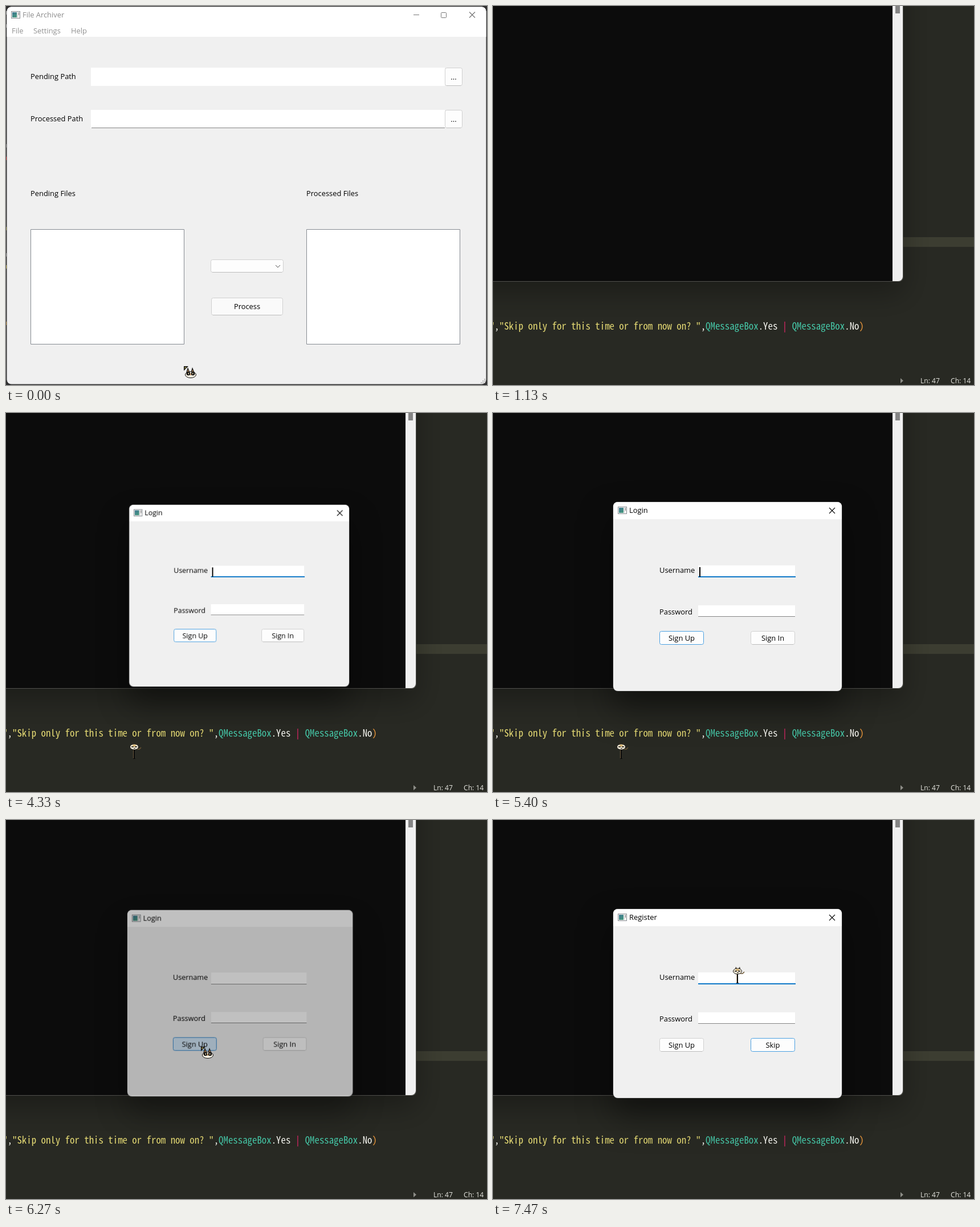
Animation of 844 by 664 pixels, one loop 8 s. Source, as an HTML page with a canvas:

```html
<!DOCTYPE html>
<html lang="en">
<head>
<meta charset="utf-8">
<title>File Archiver</title>
<style>
html, body { margin: 0; width: 100%; height: 100%; overflow: hidden; background: #282923; }
canvas { display: block; }
</style>
</head>
<body>
<canvas id="stage" width="844" height="664"></canvas>
<script>
const W = 844, H = 664, LOOP = 8000, TICK = 200 / 3;
const UI = '"Open Sans", "Noto Sans", sans-serif';
const MONO = '"Noto Sans Mono CJK JP", "Noto Sans Mono CJK SC", "Noto Sans Mono", monospace';
const stage = document.getElementById('stage').getContext('2d');
const layer = Object.assign(document.createElement('canvas'), { width: W, height: H }).getContext('2d');
let g = stage;

const lerp = (a, b, k) => a + (b - a) * k;
const clamp = k => Math.max(0, Math.min(1, k));
const smooth = k => k * k * (3 - 2 * k);

function rect(x, y, w, h, color) {
  g.fillStyle = color;
  g.fillRect(x, y, w, h);
}

function box(x, y, w, h, r, fill, stroke) {
  g.beginPath();
  g.roundRect(x, y, w, h, r);
  if (fill) { g.fillStyle = fill; g.fill(); }
  if (stroke) { g.strokeStyle = stroke; g.lineWidth = 1; g.stroke(); }
}

function lines(color, width, ...paths) {
  g.strokeStyle = color;
  g.lineWidth = width;
  g.beginPath();
  for (const p of paths)
    for (let i = 0; i < p.length; i += 2) i ? g.lineTo(p[i], p[i + 1]) : g.moveTo(p[i], p[i + 1]);
  g.stroke();
}

function shape(color, ...p) {
  g.fillStyle = color;
  g.beginPath();
  for (let i = 0; i < p.length; i += 2) g.lineTo(p[i], p[i + 1]);
  g.fill();
}

function oval(x, y, rx, ry, fill, stroke) {
  g.beginPath();
  g.ellipse(x, y, rx, ry, 0, 0, 7);
  g.fillStyle = fill;
  g.fill();
  if (stroke) { g.strokeStyle = stroke; g.lineWidth = 1; g.stroke(); }
}

function text(s, x, y, color = '#000', size = 12.9, align = 'left') {
  g.font = `${size}px ${UI}`;
  g.textAlign = align;
  g.fillStyle = color;
  g.fillText(s, x, y);
}

function button(s, x, y, w, h, border = '#d0d0d0', fill = '#fdfdfd') {
  box(x + .5, y + .5, w - 1, h - 1, 3, fill, border);
  if (border === '#d0d0d0') rect(x + 3, y + h - 1, w - 6, 1, '#bdbdbd');
  text(s, x + w / 2, Math.round(y + h / 2 + 4.5), '#000', 12.9, 'center');
}

function closeMark(x, y, color) {
  lines(color, 1.2, [x - 5, y - 5, x + 5, y + 5], [x + 5, y - 5, x - 5, y + 5]);
}

function appIcon(x, y) {
  rect(x, y, 16, 13, '#8b8f94');
  rect(x + 1, y + 1, 14, 11, '#f4f4f4');
  const teal = g.createLinearGradient(x, y, x + 8, y + 12);
  teal.addColorStop(0, '#3c6f98');
  teal.addColorStop(1, '#46997c');
  rect(x + 2, y + 2, 8, 9, teal);
  rect(x + 11, y + 2, 1, 9, '#c8c8c8');
  rect(x + 13, y + 2, 1, 5, '#777');
}

function mainWindow(n) {
  rect(0, 0, W, H, '#303030');
  for (const [y, c] of [[12, '#888'], [35, '#888'], [245, '#777'], [267, '#b33'], [390, '#8a8440'],
    [436, '#888'], [457, '#a99a40'], [556, '#a87a30']]) rect(0, y - 3, 1, 6, c);
  g.save();
  g.beginPath();
  g.roundRect(1.5, 1.5, 841, 661, 8);
  g.clip();
  rect(0, 0, W, H, '#f0f0f0');
  rect(0, 0, W, 54, '#fff');
  g.restore();

  appIcon(9, 9);
  text('File Archiver', 29, 20, '#8c8c8c');
  lines('#777', 1, [715, 15.5, 725, 15.5]);
  box(763.5, 11.5, 9, 9, 1, null, '#777');
  closeMark(818, 15.5, '#777');
  [['File', 10], ['Settings', 48], ['Help', 114]].forEach(([s, x]) => text(s, x, 48, '#929292'));

  [['Pending Path', 108], ['Processed Path', 182]].forEach(([s, y], i) => {
    text(s, 43, y + 20);
    rect(149, y, 621, 32, '#fff');
    if (i || n >= 8) rect(150, y + 31, 620, 1, '#868686');
    button('...', 770, y, 31, 32);
  });

  text('Pending Files', 43, 333);
  text('Processed Files', 527, 333);
  for (const x of [43.5, 527.5]) box(x, 391.5, 269, 201, 0, '#fff', '#868b92');

  button('', 359, 444, 128, 23);
  lines('#555', 1, [473, 454, 477, 458, 481, 454]);
  const glow = Math.round(lerp(250, 253, clamp(n / 3)));
  button('Process', 360, 511, 126, 31, undefined, `rgb(${glow},${glow},${glow})`);

  for (let i = 0; i < 3; i++)
    for (let j = 0; j <= i; j++) rect(839 - 3 * j, 653 + 3 * i, 2, 2, '#b4b4b4');
}

function codeLine() {
  const pitch = 8.42, probe = 100;
  g.textAlign = 'left';
  g.font = `${probe}px ${MONO}`;
  g.font = `${pitch * probe / g.measureText('0').width}px ${MONO}`;
  let x = 2.6 - pitch;
  for (const [s, c] of [['"', '#e6db74'], [',', '#f8f8f2'],
    ['"Skip only for this time or from now on? "', '#e6db74'], [',', '#f8f8f2'],
    ['QMessageBox', '#46c9a9'], ['.Yes ', '#f8f8f2'], ['| ', '#f92672'],
    ['QMessageBox', '#46c9a9'], ['.No', '#f8f8f2'], [')', '#f09a3c']]) {
    g.fillStyle = c;
    g.fillText(s, x, 567);
    x += s.length * pitch;
  }
}

function shadowBox(x, y, w, h, fill, blur, drop, alpha) {
  g.save();
  g.shadowColor = `rgba(0,0,0,${alpha})`;
  g.shadowBlur = blur;
  g.shadowOffsetY = drop;
  box(x, y, w, h, 8, fill);
  g.restore();
}

function editor() {
  rect(0, 0, W, H, '#282923');
  rect(0, 405, W, 17, '#3c3d31');
  shadowBox(-100, -100, 820, 583, '#50504c', 50, 20, .3);
  box(-100, -100, 819, 582, 8, '#f0f0f0');
  rect(0, 0, 701, 482, '#0c0c0c');
  rect(706, 0, 8, 13, '#858585');
  codeLine();
  shape('#8d8d87', 715, 652, 720, 656.5, 715, 661);
  text('Ln: 47', 750, 661, '#e4e4de', 12.1);
  text('Ch: 14', 803, 661, '#e4e4de', 12.1);
}

function dialog({ title, second, primary, caret, focus, hover, closing }) {
  const blue = '#4ba0e1';
  shadowBox(210.5, 155.5, 402, 332, '#4a4a4a', 56, 30, .42);
  box(211, 156, 401, 331, 8, '#f0f0f0');
  box(211, 156, 401, 30, [8, 8, 0, 0], '#fff');
  appIcon(219, 164);
  text(title, 239, 175);
  if (!closing) closeMark(595, 171, '#111');

  text('Username', 292, 280);
  rect(360, 267, 170, 21, '#fff');
  if (focus) rect(360, 286, 171, 2, '#0f78c8');
  else rect(360, 287, 170, 1, '#868686');
  if (caret) rect(362, 270, 2, 17, '#000');
  text('Password', 292, 353);
  rect(360, 337, 170, 20, '#fff');
  rect(360, 356, 170, 1, '#868686');

  const edge = i => primary === i ? blue : undefined;
  button('Sign Up', 292, 382, 78, 24, hover ? '#2f86cc' : edge(0), hover ? '#d3e9fa' : undefined);
  button(second, 452, 382, 78, 24, edge(1));
}

// Dialogs scale around a fixed point while they open and close.
function showDialog(options, scale, alpha) {
  g = layer;
  g.clearRect(0, 0, W, H);
  dialog(options);
  g = stage;
  g.save();
  g.globalAlpha = alpha;
  g.translate(350, 283);
  g.scale(scale, scale);
  g.drawImage(layer.canvas, -350, -283);
  g.restore();
}

const OPENING = [.962, .985, .996];
const openScale = age => OPENING[age] ?? 1;

function dialogs(n) {
  if (n >= 65 && n < 97) {
    const out = n - 93;
    const closing = out > 0;
    showDialog({
      title: 'Login', second: 'Sign In', primary: 0, closing,
      focus: n < 92, hover: n >= 89, caret: n < 73 || (n >= 81 && n < 89)
    }, closing ? 1 - .014 * out : openScale(n - 65), closing ? [.74, .4, .12][out - 1] : 1);
  }
  if (n >= 102) {
    showDialog({ title: 'Register', second: 'Skip', primary: 1, focus: true, caret: n < 112 },
      openScale(n - 102), 1);
  }
}

function arrowCat(x, y) {
  g.save();
  g.translate(x, y);
  shape('#111', 0, 0, 8, 0, 0, 8);
  shape('#a59a52', 1.5, 1.5, 5, 1.5, 1.5, 5);
  for (const ear of [5, 13]) {
    shape('#111', ear - 1, 12, ear + 2, 2, ear + 6, 12);
    shape('#b98a5c', ear + 1, 10, ear + 2.3, 5.5, ear + 4, 10);
  }
  oval(12, 15, 9.5, 5.5, '#f6efe2', '#111');
  oval(8, 13, 3.3, 3.3, '#111');
  oval(16, 13, 3.3, 3.3, '#111');
  oval(8.3, 13, 1, 1.4, '#d9c49a');
  oval(15.7, 13, 1, 1.4, '#d9c49a');
  rect(11, 13, 2, 3, '#c79a6a');
  g.restore();
}

function beamCat(x, y) {
  g.save();
  g.translate(x, y);
  shape('#3a2f22', 4, 4, 5, 0, 7.5, 4);
  shape('#3a2f22', 9.5, 4, 12, 0, 13, 4);
  lines('#6a5533', 1.5, [13, 12, 17, 12, 20, 9]);
  rect(6.5, 13, 1, 15, '#a8875a');
  rect(7, 13, 2, 16, '#0a0a0a');
  rect(6, 28, 4, 1, '#0a0a0a');
  oval(8, 8, 7.5, 5, '#f3ead6', '#1a1a1a');
  oval(8, 5.5, 3, 2, '#d9b878');
  rect(3, 7, 4, 1.5, '#111');
  rect(9, 7, 4, 1.5, '#111');
  rect(7, 10, 3, 1, '#111');
  g.restore();
}

function pointer(n) {
  if (n < 17) {
    const nudge = clamp(n / 3) * 2, k = clamp((n - 13) / 3);
    arrowCat(lerp(312 + nudge, 193, k), lerp(631 - nudge, 654, k));
  } else if (n >= 21 && n <= 81) {
    const k = clamp((n - 20) / 4);
    beamCat(lerp(192, 217, k), lerp(664, 577, smooth(k)));
  } else if (n > 81 && n < 97) {
    const k = smooth(clamp((n - 81) / 9));
    const x = lerp(217, 342, k), y = lerp(577, 397, k);
    (y > 487 ? beamCat : arrowCat)(x, y);
  } else if (n >= 97 && n < 107) {
    const k = clamp((n - 96) / 9);
    const x = lerp(342, 426, k), y = lerp(397, 326, smooth(k));
    (n > 104 ? beamCat : arrowCat)(x, y);
  } else if (n >= 107) {
    const k = clamp((n - 106) / 3);
    beamCat(lerp(426, 421, k), lerp(326, 257, k));
  }
}

function draw(now) {
  const n = Math.floor((now % LOOP + 4) / TICK);
  g = stage;
  if (n < 17) mainWindow(n);
  else {
    editor();
    dialogs(n);
  }
  pointer(n);
}

const start = performance.now();
function frame() {
  draw(performance.now() - start);
  requestAnimationFrame(frame);
}
frame();
</script>
</body>
</html>
```
